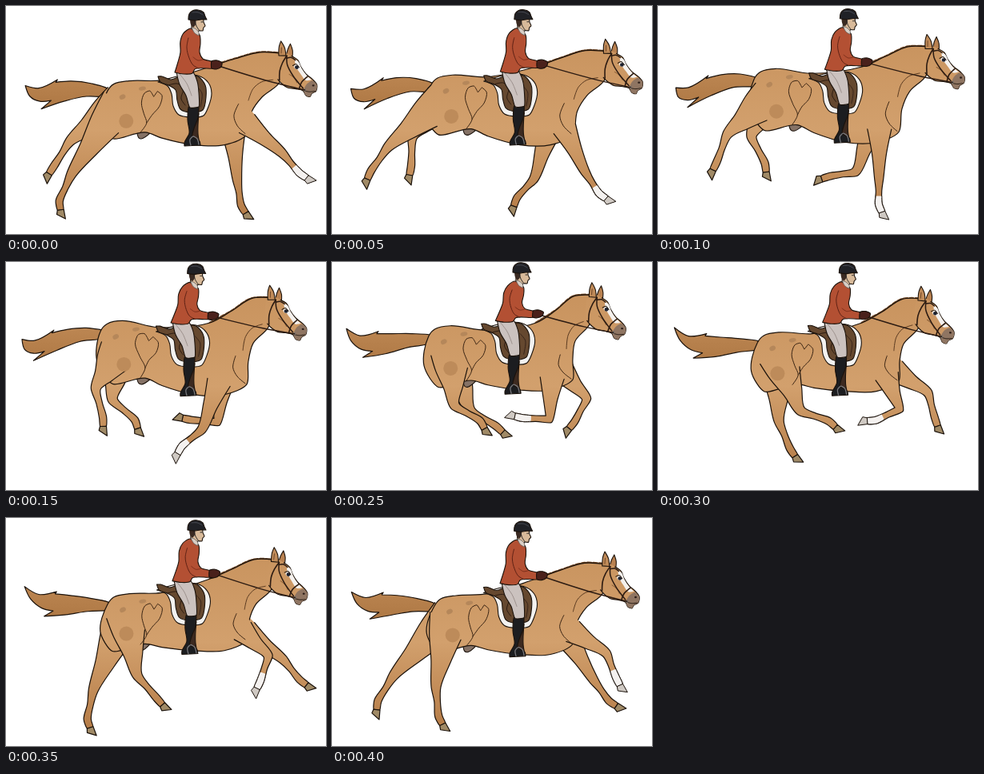
Animation, 400 px wide and 285 px high, one loop 0.45 s. Source, as an HTML page with a canvas:

```html
<!DOCTYPE html>
<html lang="en">
<head>
<meta charset="utf-8">
<title>Galloping horse</title>
<style>
html, body { margin: 0; width: 100%; height: 100%; overflow: hidden; background: #fff; }
canvas { display: block; }
</style>
</head>
<body>
<canvas id="stage" width="400" height="285"></canvas>
<script>
const ctx = document.getElementById('stage').getContext('2d');
const INK = '#1b120b', STEP = 50, STEPS = 9;

const mix = (a, b, k) => a + (b - a) * k;
const between = (a, b, k) => [mix(a[0], b[0], k), mix(a[1], b[1], k)];
const pairs = a => Array.from({ length: a.length / 2 }, (_, i) => [a[2 * i], a[2 * i + 1]]);
const unit = (x, y) => { const d = Math.hypot(x, y) || 1; return [x / d, y / d]; };
const rad = deg => deg * Math.PI / 180;
const ease = k => { k = Math.min(1, Math.max(0, k)); return k * k * (3 - 2 * k); };

// Cosine over one stride, highest at the given step.
const wave = (s, peak) => Math.cos(2 * Math.PI * (s - peak) / STEPS);

// Smooth cyclic curve through evenly spaced keys.
function cycle(keys, s) {
  const n = keys.length, x = ((s / STEPS) % 1) * n, i = Math.floor(x), t = x - i;
  const [a, b, c, d] = [-1, 0, 1, 2].map(k => keys[(i + k + n) % n]);
  return b + t / 2 * (c - a + t * (2 * a - 5 * b + 4 * c - d + t * (3 * (b - c) + d - a)));
}

// Angles in degrees from straight down, forward positive; the far leg leads by some steps.
const HIND = {
  swing: [-34, -52, -31, -6, 23, 1], reach: [108, 79, 54, 61, 74, 81],
  cannon: [-24, -33, 14, 48, 70, 22], foot: [8, -32, 2, 18, 48, 34],
  shin: 37, lead: 1.5, widths: [24, 20, 12, 6, 3.8, 4.6, 3.8], cut: 0
};
const FORE = {
  swing: [50, 12, -20, -14, 20, 54], reach: [83, 86, 90, 79, 63, 67],
  cannon: [41, 20, -50, -95, -65, 5], foot: [55, 42, -30, -98, -85, 5],
  shin: 32, lead: 1.8, widths: [18, 15, 9, 5.6, 3.7, 4.4, 3.8], cut: 1
};

// Body at rest: topline from tail to poll, then back along the underside.
const TOP = pairs([123,98, 131,89, 150,85, 192,88, 255,76, 283,63, 310,50, 335,50]);
const UNDER = pairs([332,86, 312,106, 304,127, 301,154, 273,167, 235,167, 195,159,
  174,152, 133,160, 116,134]);
// Along the tail and across it.
const TAIL = pairs([0,-4, 25,-8, 50,-9, 69,-9, 67,-12, 90,-6, 107,-14, 101,1, 88,11,
  74,13, 86,21, 58,16, 30,9, 0,5]);

function bodyWarp(s) {
  return ([x, y]) => {
    const rump = ease((235 - x) / 80), low = ease((y - 110) / 45);
    const neck = ease((x - 255) / 75) * ease((150 - y) / 50);
    const c = wave(s, 7.9);
    return [
      x + rump * 5 * c * (1 - low) + neck * 10 * wave(s, .2),
      y + rump * mix(12, 8, low) * c + neck * 9.5 * wave(s, 8.9)
        + (1 - rump) * low * 7 * wave(s, .5)
    ];
  };
}

// The hat stays calm while the seat follows the back.
function riderWarp(s) {
  const hat = wave(s, .3) - 1, seat = wave(s, .1) - 1;
  return a => pairs(a).map(([x, y]) => {
    const k = Math.min(1, Math.max(0, (y - 30) / 55));
    return [x + mix(hat, 3.5 * seat, k), y + mix(2 * hat, 5 * seat, k)];
  });
}

// Smooth path through the points; tight turns stay sharp.
function trace(p, closed) {
  const n = p.length;
  const tan = p.map((b, i) => {
    if (!closed && (i === 0 || i === n - 1)) return [0, 0];
    const a = p[(i + n - 1) % n], c = p[(i + 1) % n];
    const u = unit(b[0] - a[0], b[1] - a[1]), v = unit(c[0] - b[0], c[1] - b[1]);
    const t = unit(u[0] + v[0], u[1] + v[1]);
    const k = Math.sqrt(Math.max(0, u[0] * v[0] + u[1] * v[1])) / 3;
    return [t[0] * k, t[1] * k];
  });
  ctx.beginPath();
  ctx.moveTo(...p[0]);
  for (let i = 0; i < (closed ? n : n - 1); i++) {
    const j = (i + 1) % n, a = p[i], b = p[j];
    const d = Math.hypot(b[0] - a[0], b[1] - a[1]);
    ctx.bezierCurveTo(a[0] + tan[i][0] * d, a[1] + tan[i][1] * d,
      b[0] - tan[j][0] * d, b[1] - tan[j][1] * d, b[0], b[1]);
  }
  if (closed) ctx.closePath();
}

function line(p, color = INK, width = 1) {
  trace(p, false);
  ctx.strokeStyle = color;
  ctx.lineWidth = width;
  ctx.stroke();
}

function shape(p, fill, stroke = INK, width = 1.1) {
  trace(p, true);
  ctx.fillStyle = fill;
  ctx.fill();
  if (!stroke) return;
  ctx.strokeStyle = stroke;
  ctx.lineWidth = width;
  ctx.stroke();
}

function oval([x, y], rx, ry, fill, turn = 0) {
  ctx.beginPath();
  ctx.ellipse(x, y, rx, ry, turn, 0, 7);
  ctx.fillStyle = fill;
  ctx.fill();
}

function shade(y0, y1, ...colors) {
  const g = ctx.createLinearGradient(0, y0, 0, y1);
  colors.forEach((c, i) => g.addColorStop(i / (colors.length - 1), c));
  return g;
}
const COAT = shade(50, 260, '#c9945f', '#d2a06d', '#b67d48');
const TAIL_COAT = shade(80, 130, '#bd8753', '#ad7743');

// Outline of a chain of joints with a half width at each: rear side, then front.
function ribbon(p, w) {
  const rear = [], front = [];
  p.forEach((b, i) => {
    const a = p[Math.max(0, i - 1)], c = p[Math.min(p.length - 1, i + 1)];
    const u = unit(b[0] - a[0], b[1] - a[1]), v = unit(c[0] - b[0], c[1] - b[1]);
    const [x, y] = unit(u[0] + v[0], u[1] + v[1]);
    rear.push([b[0] - y * w[i], b[1] + x * w[i]]);
    front.unshift([b[0] + y * w[i], b[1] - x * w[i]]);
  });
  return rear.concat(front);
}

function leg(root, gait, s, sock) {
  const value = name => cycle(gait[name], s);
  const move = ([x, y], deg, len) => [x + len * Math.sin(rad(deg)), y + len * Math.cos(rad(deg))];
  const foot = value('foot');
  const knee = move(root, value('swing'), value('reach'));
  const fetlock = move(knee, value('cannon'), gait.shin);
  const coronet = move(fetlock, foot, 11);
  const chain = [root, between(root, knee, .3), between(root, knee, .65), knee,
    between(knee, fetlock, .5), fetlock, coronet];

  // The upper end melts into the body without a line.
  const edge = ribbon(chain, gait.widths);
  trace(edge, false);
  ctx.fillStyle = COAT;
  ctx.fill();
  line(edge.slice(gait.cut, -1), INK, 1.2);
  if (sock) {
    const white = ribbon([between(knee, fetlock, .7), fetlock, coronet], [3.8, 4.4, 3.8]);
    shape(white, '#f4f1ef', null);
    line(white);
  }
  const at = (along, ahead) => move(move(coronet, foot, along), foot + 90, ahead);
  ctx.beginPath();
  [at(0, 4), at(12, 4.5), at(5, -5.5), at(0, -4)].forEach(q => ctx.lineTo(...q));
  ctx.closePath();
  ctx.fillStyle = sock ? '#cfc9c3' : '#a08a66';
  ctx.fill();
  ctx.stroke();
}

function tail(s, [x0, y0]) {
  const angle = rad(3 + 9 * wave(s, 2.4)), arch = 4 + 7 * wave(s, 1.2);
  const c = Math.cos(angle), n = Math.sin(angle);
  shape(TAIL.map(([x, y]) => {
    const v = y - arch * Math.sin(Math.PI * x / 107);
    return [x0 + 4 - x * c - v * n, y0 + 3 + x * n + v * c];
  }), TAIL_COAT, INK, 1.2);
}

function marks(warp) {
  const inside = a => pairs(a).map(warp);
  oval(warp([142, 105]), 4, 3, '#b5875a', -.5);
  oval(warp([167, 95]), 4.5, 2.5, '#b5875a', -.2);
  oval(warp([149, 137]), 9, 9, '#bd8b5a');
  line(inside([168,152, 175,140, 170,127, 166,113, 170,101, 177,99, 182,107, 187,101,
    193,107, 190,120, 181,130, 175,140]), '#3a2413');
  line(inside([324,83, 311,87, 302,97, 298,113]), '#5a3a20');
  line(inside([288,119, 284,133, 289,144, 299,153]), '#3a2413');
}

function saddle(s) {
  const k = wave(s, .1) - 1;
  const fit = a => pairs(a).map(([x, y]) => [x + 1.7 * k, y + 5.5 * k]);
  shape(fit([190,95, 202,100, 207,110, 209,125, 216,136, 231,139, 247,137, 253,126,
    257,109, 253,96, 240,87, 214,88]), '#f3f2f0');
  shape(fit([190,88, 195,88, 206,92, 218,88, 240,88, 249,99, 250,114, 246,130,
    231,133, 218,129, 214,118, 212,105, 203,99, 193,95]), '#65482f');
  line(fit([203,99, 214,97, 222,102, 219,116, 224,124]), '#2a1a10');
  line(fit([238,100, 245,109, 243,126]), '#38241a');
}

function rider(warp) {
  // Stirrup leather, boot and breeches
  shape(warp([233,135, 241,134, 240,160, 242,171, 234,170]), '#3d2a20');
  shape(warp([229,125, 241,125, 240,140, 235,153, 233,163, 242,169, 243,174, 223,175,
    223,171, 229,159, 227,142]), '#1c1d20');
  line(warp([231,174, 230,167, 234,163, 239,166, 241,173]), '#77777b', 1.3);
  shape(warp([213,82, 233,82, 239,94, 241,108, 241,126, 230,127, 225,112, 217,98]), '#cbc2bf');
  line(warp([217,85, 226,97, 232,112]), '#9c908c');

  // Head
  shape(warp([233,17, 247,16, 247,20, 249,25, 247,27, 246,31, 241,31, 240,36, 233,32]), '#d8ba9a');
  shape(warp([230,15, 237,16, 237,23, 234,27, 231,23]), '#3a2a22', null);
  line(warp([236,17, 238,25, 242,31]), '#222', 1);
  line(warp([244,20, 246,20]), '#222', 1);
  shape(warp([228,17, 229,10, 233,6, 240,5, 247,8, 249,13, 251,17, 244,17, 236,18]), '#202126');
  line(warp([233,8, 240,8, 246,11]), '#4b4d55');

  // Jacket and glove
  shape(warp([231,28, 237,32, 242,36, 243,47, 242,58, 246,66, 258,70, 258,78, 236,79,
    233,84, 222,85, 211,83, 215,70, 218,58, 218,44, 222,34]), '#b35033');
  shape(warp([232,27, 236,28, 241,33, 241,37, 236,34]), '#d9cfc6', '#555', .7);
  line(warp([228,40, 226,52, 229,65, 234,74, 241,78]), '#5e2114');
  line(warp([234,64, 240,68, 246,67]), '#7c2e1b');
  shape(warp([257,69, 264,68, 270,71, 269,76, 263,79, 257,78]), '#4a211b');
}

function mane(crest) {
  ctx.setLineDash([5, 2.5]);
  line(crest, '#6d4423', 3);
  ctx.setLineDash([]);
}

function head({ x, y, turn }) {
  ctx.save();
  ctx.translate(x, y);
  ctx.rotate(turn);
  ctx.translate(-345, -62);
  shape(pairs([350,63, 352,53, 355,46, 358,54, 358,64]), '#b98150');
  shape(pairs([340,60, 350,58, 359,62, 365,66, 369,74, 376,83, 385,90, 390,96, 389,104,
    384,107, 382,111, 377,110, 373,104, 364,102, 354,101, 346,96, 341,90, 338,74]), COAT, null);
  line(pairs([357,61, 365,66, 369,74, 376,83, 385,90, 390,96, 389,104, 384,107, 382,111,
    377,110, 373,104, 364,102, 354,101, 346,96, 341,91]), INK, 1.2);
  shape(pairs([361,65, 366,68, 370,76, 377,85, 383,90, 376,91, 369,83, 363,74]), '#f4f1ee', null);
  shape(pairs([384,91, 390,96, 389,104, 384,107, 382,111, 377,110, 374,104, 377,96]), '#8f7562', null);
  line(pairs([375,104, 381,105, 388,104]), INK, .9);
  oval([385.5, 97], 1.5, 1.2, '#2b1d18');
  shape(pairs([341,61, 341,50, 343,43, 348,51, 350,61]), '#c08b59');
  line(pairs([344,58, 344,51]), '#6e4526');
  oval([363.5, 74.5], 3.2, 2.6, '#f2ebe4', .6);
  oval([364, 75], 2.4, 2.3, '#1d2230');
  line(pairs([359,73, 363,71, 367,75]), INK, 1);
  line(pairs([355,84, 361,88, 365,94]), '#8d6038');
  // Bridle
  line(pairs([351,61, 346,70, 343,80, 343,92]), '#2c1b12', 1.6);
  line(pairs([351,61, 352,72, 360,86, 373,101]), '#2c1b12', 1.5);
  line(pairs([351,64, 357,63, 362,66]), '#2c1b12', 1.5);
  line(pairs([368,102, 371,93, 378,86]), '#2c1b12', 1.6);
  oval([375, 103], 1.7, 1.7, '#77706a');
  ctx.restore();
}

function reins({ x, y, turn }, hand) {
  const c = Math.cos(turn), n = Math.sin(turn);
  const bit = [x + 30 * c - 41 * n, y + 30 * n + 41 * c];
  const [mx, my] = between(hand, bit, .6);
  line([hand, [mx, my + 1.5], bit], '#2c1b12', 1.4);
}

function draw() {
  const s = Math.floor(performance.now() / STEP) % STEPS;
  const warp = bodyWarp(s), seat = riderWarp(s);
  const top = TOP.map(warp), under = UNDER.map(warp);
  const pose = {
    x: 335 + 10 * wave(s, .2),
    y: 53.5 + 9.5 * wave(s, 8.9),
    turn: rad(3 + 3 * wave(s, 6.3))
  };
  const hip = [144 + 6 * wave(s, 6.3), 117 + 5 * wave(s, 7.9)];
  const shoulder = [279 + 4 * wave(s, 8), 127 + 4 * wave(s, 0)];

  ctx.fillStyle = '#fff';
  ctx.fillRect(0, 0, 400, 285);
  ctx.lineJoin = ctx.lineCap = 'round';
  tail(s, top[0]);
  leg(hip, HIND, s + HIND.lead);
  leg(shoulder, FORE, s + FORE.lead);
  shape(pairs([163,148, 180,153, 170,160, 166,159]).map(warp), '#857266');
  mane(top.slice(4));
  shape(top.concat(under), COAT, INK, 1.2);
  leg(hip, HIND, s);
  leg(shoulder, FORE, s, true);
  marks(warp);
  head(pose);
  saddle(s);
  reins(pose, seat([266, 75])[0]);
  rider(seat);
  requestAnimationFrame(draw);
}
draw();
</script>
</body>
</html>
```
